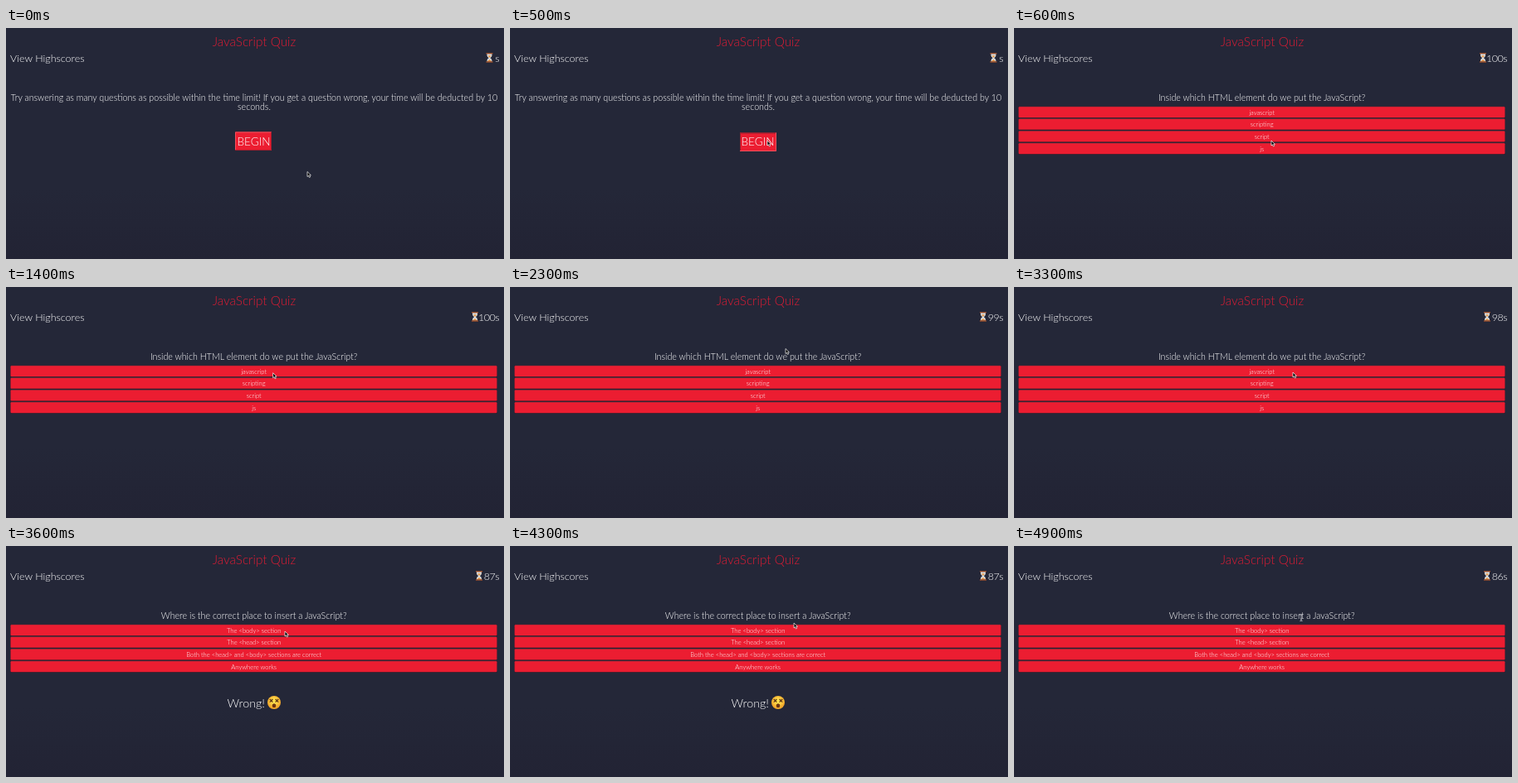
These frames come from a looping animation (600x279 px, 5000 ms). An HTML page:

```html
<!DOCTYPE html>
<html lang="en">
<head>
<meta charset="utf-8">
<title>JavaScript Quiz</title>
<style>
  html, body { margin: 0; height: 100%; overflow: hidden; background: #242738; }
  svg { display: block; width: 100vw; height: 100vh; }
  text { font-family: Lato, "Open Sans", sans-serif; font-weight: 300; fill: #fff; }
  .mid { text-anchor: middle; }
  .title { font-size: 15.3px; fill: #dc1c34; }
  .side { font-size: 12.5px; }
  .timer { text-anchor: end; letter-spacing: -.5px; }
  .body { font-size: 10.7px; }
  .answer { font-size: 7.6px; }
  .begin { font-size: 13.6px; }
  .verdict { font-size: 14.3px; }
</style>
</head>
<body>
<svg viewBox="0 0 600 279" preserveAspectRatio="none">
  <defs>
    <linearGradient id="page" x2="0" y2="1">
      <stop offset=".7" stop-color="#242738"/>
      <stop offset="1" stop-color="#222334"/>
    </linearGradient>
    <radialGradient id="skin" cy=".4">
      <stop offset=".3" stop-color="#ffe04d"/>
      <stop offset="1" stop-color="#f3a72b"/>
    </radialGradient>
  </defs>
  <rect width="600" height="279" fill="url(#page)"/>
  <text class="mid title" x="299" y="21.6">JavaScript Quiz</text>
  <text class="side" x="5" y="41">View Highscores</text>
  <text class="side timer" id="timer" x="594" y="41"></text>

  <g id="hourglass">
    <path d="M-3 31h6v2q0 2-2.2 3.2 2.2 1 2.2 3.3v1h-6v-1q0-2.300 2.200-3.300-2.200-1.200-2.200-3.200z" fill="#dbe0e4"/>
    <path d="M-2 33.300h4l-1.600 2.400h-.8zM-2.400 40.500q.4-2 2.400-2.600 2 .6 2.400 2.600z" fill="#e79a4c"/>
    <path d="M-4 30.700h8M-4 41h8" stroke="#98502f" stroke-width="1.400"/>
  </g>

  <g id="intro">
    <text class="mid body" x="299" y="88">Try answering as many questions as possible within the time limit! If you get a question wrong, your time will be deducted by 10</text>
    <text class="mid body" x="299" y="99.200">seconds.</text>
    <g id="begin">
      <rect x="276" y="125.500" width="44" height="22.500" fill="#ec1d31"/>
      <path id="lit" d="M276.500 148v-22h43.500" fill="none"/>
      <path id="shaded" d="M276 147.500h43.500v-22" fill="none"/>
    </g>
    <text class="mid begin" x="298.500" y="142.300">BEGIN</text>
  </g>

  <g id="quiz">
    <text class="mid body" id="question" x="298.700" y="88"></text>
    <g id="answers"></g>
  </g>

  <g id="wrong">
    <text class="verdict" x="266.500" y="195">Wrong!</text>
    <circle cx="323" cy="189" r="8" fill="url(#skin)"/>
    <path d="M317.800 185l3.600 3.600m0-3.600l-3.600 3.600M324.600 185l3.600 3.600m0-3.600l-3.600 3.600" stroke="#5f3515" stroke-width="1.300"/>
    <ellipse cx="323" cy="192.800" rx="2.300" ry="2.500" fill="#6b3413"/>
  </g>

  <g id="cursor">
    <path id="arrow" d="M0 0v6l1.400-1.200 1 2.200 1.200-.5-1-2.200h1.800z" fill="#000" stroke="#fff" stroke-width=".7"/>
    <path id="beam" d="M-1.500-3.500q1.500 0 1.500.8v6q0 .8-1.500.8M1.500-3.500q-1.500 0-1.500.8M1.500 4.100q-1.500 0-1.500-.8M-.8 1.600h1.600" fill="none" stroke="#d5d5dc" stroke-width=".8"/>
  </g>
</svg>
<script>
  const LOOP = 5000, STEP = 100;
  const START = 600, ANSWERED = 3500, VERDICT_END = 4500;
  const $ = id => document.getElementById(id);

  const quizzes = [
    { question: 'Inside which HTML element do we put the JavaScript?',
      answers: ['javascript', 'scripting', 'script', 'js'] },
    { question: 'Where is the correct place to insert a JavaScript?',
      answers: ['The <body> section', 'The <head> section',
        'Both the <head> and <body> sections are correct', 'Anywhere works'] }
  ];

  // [time, x, y] of the pointer
  const pointerPath = [
    [0, 363, 173.5], [100, 361, 172], [500, 310, 136], [1000, 310, 136],
    [1500, 323, 100], [2100, 332, 74.5], [2300, 332, 74.5], [2800, 334, 88],
    [3300, 336, 103], [3900, 336, 103], [4600, 346, 86.5], [5000, 346, 86.5]
  ];

  const timerSteps = [[0, ''], [600, 100], [1600, 99], [2600, 98], [3600, 87], [4600, 86]];

  function add(parent, tag, attributes) {
    const node = document.createElementNS('http://www.w3.org/2000/svg', tag);
    for (const name in attributes) node.setAttribute(name, attributes[name]);
    return parent.appendChild(node);
  }

  const labels = [0, 1, 2, 3].map(i => {
    const y = 95 + i * 14.65, box = { x: 5.5, width: 586, rx: 1.2 };
    add($('answers'), 'rect', { ...box, y: y - .5, height: 14.2, fill: '#171b29' });
    add($('answers'), 'rect', { ...box, y, height: 13.2, fill: '#ec1d31' });
    add($('answers'), 'path', { d: `M6 ${y}h585`, stroke: '#74323f', 'stroke-width': .6 });
    return add($('answers'), 'text', { class: 'mid answer', x: 298.7, y: y + 9.7 });
  });

  const show = (id, visible) => $(id).setAttribute('visibility', visible ? 'visible' : 'hidden');
  const move = (id, x, y) => $(id).setAttribute('transform', `translate(${x} ${y})`);

  function pointerAt(time) {
    const next = pointerPath.findIndex(([at]) => at > time);
    const [t0, x0, y0] = pointerPath[next - 1], [t1, x1, y1] = pointerPath[next];
    const k = (time - t0) / (t1 - t0), ease = k * k * (3 - 2 * k);
    return [x0 + (x1 - x0) * ease, y0 + (y1 - y0) * ease];
  }

  function draw(now) {
    const time = Math.floor(now % LOOP / STEP) * STEP;
    const started = time >= START, answered = time >= ANSWERED;

    show('intro', !started);
    show('quiz', started);
    show('wrong', answered && time < VERDICT_END);

    const pressed = time >= 500;
    move('begin', pressed ? 1 : 0, pressed ? 1 : 0);
    $('lit').setAttribute('stroke', pressed ? '#94202f' : '#f0535f');
    $('shaded').setAttribute('stroke', pressed ? '#f0535f' : '#a51e2e');

    const { question, answers } = quizzes[answered ? 1 : 0];
    $('question').textContent = question;
    labels.forEach((label, i) => label.textContent = answers[i]);

    const seconds = timerSteps.filter(([at]) => at <= time).pop()[1];
    $('timer').textContent = seconds + 's';
    move('hourglass', [582.5, , 570, 565][String(seconds).length], 0);

    const [x, y] = pointerAt(time);
    const overText = started && y > 79 && y < 91;
    move('cursor', x, y);
    show('arrow', !overText);
    show('beam', overText);
    requestAnimationFrame(draw);
  }
  requestAnimationFrame(draw);
</script>
</body>
</html>
```
